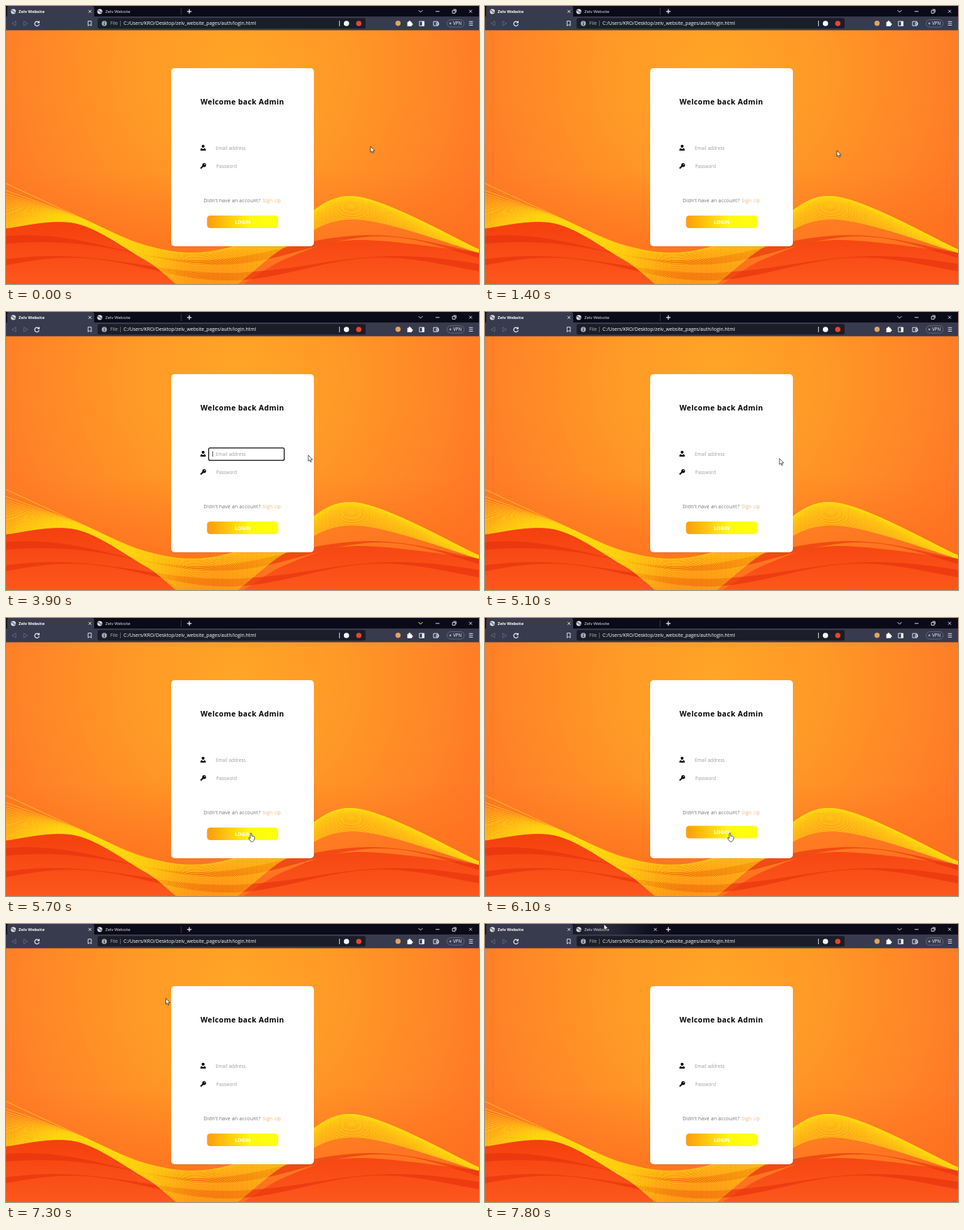
Write an HTML page that moves like this. It is 676 px wide and 398 px high and loops after 8000 ms.

```html
<!DOCTYPE html>
<html lang="en">
<head>
<meta charset="utf-8">
<title>Login</title>
<style>
html, body { margin: 0; width: 100%; height: 100%; overflow: hidden; background: #ff8426; }
svg { display: block; width: 676px; height: 398px; font: 6.4px "Open Sans", "Noto Sans", sans-serif; }
.line { fill: none; stroke: #f2f2f6; stroke-width: .9; }
.dim { fill: none; stroke: #6d6f83; stroke-width: .8; }
.light { font-weight: 300; letter-spacing: .22px; fill: #666; }
.note { font-size: 6.9px; letter-spacing: .34px; fill: #222; }
.bar { font-size: 6.9px; fill: #fff; }
</style>
</head>
<body>
<svg viewBox="0 0 676 398">
  <defs>
    <radialGradient id="sky" gradientUnits="userSpaceOnUse" cx="330" cy="95" r="430">
      <stop offset="0" stop-color="#ffa626"/><stop offset=".35" stop-color="#ff9926"/>
      <stop offset=".7" stop-color="#ff8427"/><stop offset="1" stop-color="#ff7026"/>
    </radialGradient>
    <linearGradient id="dusk" x2="0" y2="1">
      <stop offset="0" stop-color="#ff6f1c" stop-opacity="0"/><stop offset="1" stop-color="#ff6f1c"/>
    </linearGradient>
    <linearGradient id="red" x2="0" y2="1">
      <stop offset="0" stop-color="#f4400e"/><stop offset="1" stop-color="#ff5c20"/>
    </linearGradient>
    <linearGradient id="gold">
      <stop offset="0" stop-color="#ff9b0c"/><stop offset=".6" stop-color="#fff90f"/>
      <stop offset="1" stop-color="#ffff12"/>
    </linearGradient>
    <radialGradient id="glow" gradientUnits="userSpaceOnUse" cx="170" cy="4" r="80">
      <stop offset="0" stop-color="#2a2c3e"/><stop offset="1" stop-color="#2a2c3e" stop-opacity="0"/>
    </radialGradient>
    <g id="globe">
      <circle r="3.6" fill="#d8d9e0"/>
      <path d="M-3-1Q0-2 0 0T3 1" fill="none" stroke="#34364a"/>
    </g>
    <path id="cross" class="line" d="M-2-2L2 2M2-2L-2 2"/>
  </defs>

  <rect width="676" height="398" fill="url(#sky)"/>
  <rect y="235" width="676" height="163" fill="url(#dusk)"/>
  <g id="reds"></g>
  <g id="waves" fill="none" stroke="#fff00c" stroke-width=".75" opacity=".8"></g>

  <rect x="236" y="89.6" width="204" height="255" rx="5" fill="#a83c00" opacity=".3"/>
  <rect x="236" y="89" width="204" height="255" rx="5" fill="#fff"/>
  <text x="278" y="141" font-size="10.5" font-weight="700" letter-spacing=".4">Welcome back Admin</text>
  <g transform="translate(281.7 203)">
    <circle cy="-2.2" r="2.1"/>
    <path d="M-3.8 4Q-4 .5-1.7 .4L0 2.3L1.7 .4Q4 .5 3.8 4Z"/>
  </g>
  <g transform="translate(281.7 229)">
    <path d="M1-1L-3.5 3.5" stroke="#000" stroke-width="2"/>
    <circle cx="1.5" cy="-1.3" r="2.7"/><circle cx="2.3" cy="-2" r=".8" fill="#fff"/>
  </g>
  <g id="focus">
    <rect x="289.6" y="194.6" width="108" height="17.8" rx="2" fill="none" stroke="#111" stroke-width="1.3"/>
    <path id="caret" d="M295.3 199.5V207" stroke="#111" stroke-width=".8"/>
  </g>
  <text class="light" x="300" y="205.5">Email address</text>
  <text class="light" x="300.6" y="231.5">Password</text>
  <text class="light note" x="282.6" y="281.3">Didn't have an account?</text>
  <text class="light note" x="366.8" y="281.3" style="fill:#f08a2c">Sign Up</text>
  <g id="button">
    <rect x="287.3" y="300" width="101.7" height="18" rx="4.5" fill="url(#gold)"/>
    <text x="327" y="311.8" font-size="7.1" font-weight="700" fill="#fff">LOGIN</text>
  </g>

  <rect width="676" height="16" fill="#0b0a18"/>
  <rect x="1.5" width="124.5" height="20" rx="3" fill="#383a4e"/>
  <rect y="15" width="676" height="19.7" fill="#383a4e"/>
  <use href="#globe" x="10.5" y="7.8"/>
  <text x="18" y="10" font-size="5.9" font-weight="700" fill="#fff">Zelv Website</text>
  <use href="#cross" x="120" y="7.8"/>
  <path id="divider" class="dim" d="M250.3 3V13" opacity=".6"/>
  <g id="hover">
    <rect x="127" width="124" height="15" fill="url(#glow)"/>
    <use href="#cross" x="243.5" y="7.8"/>
  </g>
  <use href="#globe" x="134" y="7.8"/>
  <text x="142" y="10" font-size="6.1" fill="#f0f0f4">Zelv Website</text>
  <path class="line" d="M258.8 7.8h6.4m-3.2-3.2v6.4" style="stroke-width:1.2"/>
  <path class="line" d="M589.5 6l3 3 3-3M614 7.8h5.5M638 6.3h4v4h-4zM639.4 5h3.8v4"/>
  <use href="#cross" x="664" y="7.6"/>

  <path class="dim" d="M14 21.8v6.4l-5.4-3.2zM25.4 21.8v6.4l5.4-3.2z"/>
  <path class="line" d="M46.8 23.4A3.2 3.2 0 1 0 47.4 26M47.4 21.4V24h-2.6" style="stroke-width:1.2"/>
  <path class="line" d="M117.3 21.6h4.6v6.8l-2.3-1.8-2.3 1.8z"/>
  <rect x="131" y="17.3" width="383" height="14.9" rx="2.5" fill="#1b1d28"/>
  <circle cx="140.5" cy="25" r="3.7" fill="#a4a6b2"/>
  <path d="M140.5 22.7v1m0 1v2.5" stroke="#1b1d28"/>
  <text class="bar" x="149" y="27.4" opacity=".65">File</text>
  <path class="dim" d="M163.5 21v8"/>
  <text class="bar" x="168" y="27.4">C:/Users/KRO/Desktop/zelv_website_pages/auth/login.html</text>
  <path class="line" d="M476.6 21v8"/>
  <circle cx="486.6" cy="25" r="3.8" fill="#f4f4f6"/>
  <circle cx="504.2" cy="25" r="3.8" fill="#e8452c"/>
  <circle cx="560.3" cy="24.8" r="3.7" fill="#e3a45c"/>
  <g fill="#fff">
    <rect x="573.6" y="22.8" width="6.2" height="6.2"/>
    <circle cx="576.8" cy="22.6" r="1.5"/><circle cx="580" cy="26" r="1.5"/>
    <rect x="594.6" y="22" width="3" height="6.4"/>
  </g>
  <path class="line" d="M590.8 22h6.8v6.4h-6.8zM611 22.2h6.2v6H611zM615 24h3.3v3H615z"/>
  <rect class="dim" x="630.3" y="19.6" width="24.6" height="10.6" rx="5.3"/>
  <circle cx="635" cy="25" r="1.4" fill="#a4a6b2"/>
  <text class="bar" x="639" y="27.2" style="font-size:6.2px">VPN</text>
  <path class="line" d="M661.7 22.3h5.6m-5.6 2.6h5.6m-5.6 2.6h5.6"/>

  <g id="cursor" stroke="#111" stroke-width=".7" stroke-linejoin="round" fill="#fff">
    <path id="arrow" d="M0 0v8.5l1.9-1.7 1.3 3 1.4-.6-1.3-2.9H6z"/>
    <path id="beam" d="M-1.5-3.8h3M0-3.8v7.6m-1.5 0h3"/>
    <path id="hand" d="M-1 7.5V.8a1 1 0 0 1 2 0V4Q5.4 4 5.4 7T2.4 12.3H1Q-1 12-3.4 7.2-3 5-1 7.5z"/>
  </g>
</svg>
<script>
const el = id => document.getElementById(id);
const show = (id, on) => el(id).style.display = on ? '' : 'none';
const { sin, cos, PI, max, min, abs, floor } = Math;

// Smooth path through points (Catmull-Rom)
function spline(p) {
  let d = `M${p[0]}`;
  for (let i = 0; i < p.length - 1; i++) {
    const a = p[i - 1] || p[i], b = p[i], c = p[i + 1], e = p[i + 2] || c;
    d += `C${b.map((v, j) => v + (c[j] - a[j]) / 6)} ${c.map((v, j) => v - (e[j] - b[j]) / 6)} ${c}`;
  }
  return d;
}

function addPath(group, d, attrs = {}) {
  const path = document.createElementNS('http://www.w3.org/2000/svg', 'path');
  for (const [name, value] of Object.entries({ d, ...attrs })) path.setAttribute(name, value);
  el(group).append(path);
}

// Ribbon edges: x, upper y, lower y
const ribbon = [
  [0, 254, 318], [100, 300, 311], [200, 343, 364], [290, 352, 418],
  [400, 318, 344], [500, 273, 305], [676, 349, 353]
];

const ground = ribbon.map(([x, , y]) => [x, y + 30 * sin(PI * max(0, x - 330) / 346)]);
addPath('reds', spline(ground) + 'V398H0Z', { fill: 'url(#red)' });

// Dark swells that follow the ribbon's rhythm
for (let i = 0; i < 2; i++) {
  const top = [], bottom = [];
  for (let x = 0; x <= 676; x += 26) {
    const y = 346 + 24 * i - (18 - 6 * i) * cos((x - 30) / 78 - i * .5);
    top.push([x, y]);
    bottom.unshift([x, y + 6 + 5 * cos(x / 60 + i)]);
  }
  addPath('reds', spline(top) + spline(bottom).replace('M', 'L') + 'Z', { fill: '#e6300a', opacity: .6 });
}

const STRANDS = 40;
for (let i = 0; i < STRANDS; i++) {
  const k = i / (STRANDS - 1);
  addPath('waves', spline(ribbon.map(([x, a, b]) => [x, a + (b - a) * k ** (.5 + x / 400)])));
}

// 0 to 1 with a soft start and stop
function ease(t, from, to) {
  const f = max(0, min(1, (t - from) / (to - from)));
  return f * f * (3 - 2 * f);
}

// Pointer moves: start and end in ticks of 100 ms, then the place reached
const home = [521, 201];
const moves = [
  [11, 14, 503, 207], [14, 18, 398, 200], [21, 23, 388, 206], [33, 37, 422, 206], [38, 39, 432, 205],
  [41, 43, 425, 204], [50, 57, 350, 308], [70, 74, 206, 69], [76, 78, 170, 0]
];

function pointer(t) {
  let [x, y] = home;
  for (const [from, to, toX, toY] of moves) {
    const f = ease(t, from, to);
    x += (toX - x) * f;
    y += (toY - y) * f;
  }
  return [x, y];
}

function draw(now) {
  const tick = floor(now % 8000 / 100);
  const [x, y] = pointer(tick);
  const over = (cx, cy, w, h) => abs(x - cx) < w && abs(y - cy) < h;
  const onField = over(343.5, 203, 54, 10) || over(343.5, 229, 54, 9);
  const onButton = over(338, 309, 51, 9);
  const onTab = over(188, 0, 62, 15);
  const lift = 2.5 * (ease(tick, 57, 59) - ease(tick, 70, 72));
  el('cursor').setAttribute('transform', `translate(${x} ${y})`);
  el('button').setAttribute('transform', `translate(0 ${-lift})`);
  show('beam', onField);
  show('hand', onButton);
  show('arrow', !onField && !onButton);
  show('hover', onTab);
  show('divider', !onTab);
  show('focus', tick >= 27 && tick < 45);
  show('caret', floor((tick - 26) / 5.3) % 2 === 0);
  requestAnimationFrame(draw);
}
draw(performance.now());
</script>
</body>
</html>
```
